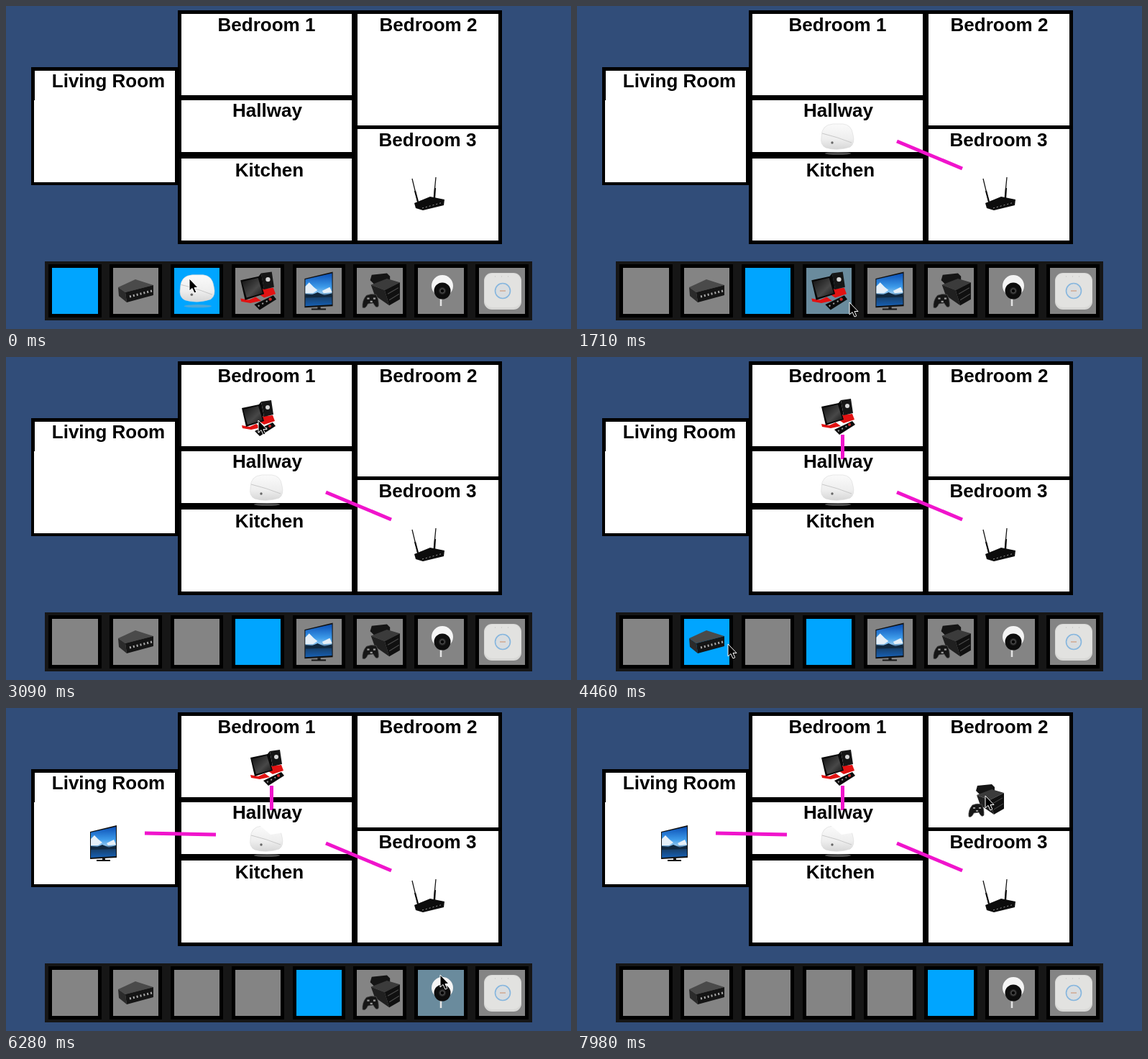
Animation, 786 px wide and 449 px high, one loop 8 s. Source, as an HTML page:

```html
<!DOCTYPE html>
<html lang="en">
<head>
<meta charset="utf-8">
<title>Room planner</title>
<style>
  html, body { margin: 0; width: 100%; height: 100%; overflow: hidden; background: #314d79; }
  svg { display: block; width: 100%; height: 100%; }
  text { font: bold 26px "Liberation Sans", Arial, sans-serif; text-anchor: middle; }
  .link { stroke: #f014cc; stroke-width: 5; }
</style>
</head>
<body>
<svg viewBox="0 0 786 449">
  <defs>
    <linearGradient id="sky" x2="0" y2="1">
      <stop stop-color="#0b4fb5"/><stop offset=".42" stop-color="#3d9bea"/>
      <stop offset=".6" stop-color="#8cc4ee"/><stop offset=".68" stop-color="#173a5e"/>
      <stop offset="1" stop-color="#1660b4"/>
    </linearGradient>
    <linearGradient id="shell" x2="0" y2="1">
      <stop stop-color="#fafafa"/><stop offset=".6" stop-color="#eee"/><stop offset="1" stop-color="#d6d6d6"/>
    </linearGradient>
    <linearGradient id="screen" x2="1" y2="1">
      <stop stop-color="#111"/><stop offset=".6" stop-color="#484848"/><stop offset="1" stop-color="#141414"/>
    </linearGradient>
  </defs>

  <path d="M35 85H240V249H35ZM239 6H690V331H239Z"/>
  <path fill="#fff" d="M40 90H235V245H39V131H40ZM244 11H481V124H244ZM244 131H481V203H244ZM244 212H481V326H244ZM489 11H685V166H489ZM489 171H685V326H489Z"/>
  <path class="link" data-from="1240" d="M445 188 536 226"/>
  <path class="link" data-from="3200" d="M369.5 108V142"/>
  <path class="link" data-from="6000" d="M193 174 292 176"/>
  <g transform="translate(.5 .4)">
    <text x="362" y="35">Bedroom 1</text>
    <text x="587" y="35">Bedroom 2</text>
    <text x="586" y="195">Bedroom 3</text>
    <text x="142" y="113">Living Room</text>
    <text x="363" y="154">Hallway</text>
    <text x="366" y="237">Kitchen</text>
  </g>

  <path fill="#161616" d="M54 355H732V437H54Z"/>
  <g id="slots" stroke="#000" stroke-width="5"></g>

  <!-- router -->
  <g transform="translate(587 261)">
    <path d="M-14 12-22-21M8 8 11-23" stroke="#161616" stroke-width="1.3"/>
    <path d="M-14 11-18-4M9 7 10-8" stroke="#111" stroke-width="2.2"/>
    <path fill="#0c0c0c" d="M-19 13 3 4 23 8 22 16-7 23-17 20Z"/>
    <path d="M-8 20 21 12" stroke="#999" stroke-dasharray="2 3"/>
  </g>
  <!-- network switch -->
  <g transform="translate(181 396)">
    <path fill="#4a4a4a" d="M-25-5-1-16 24-8-15 2Z"/>
    <path fill="#2b2b2b" d="M-25-5-15 2-13 16-24 7Z"/>
    <path fill="#151515" d="M-15 2 24-8V6L-13 16Z"/>
    <path d="M-9 8 22 0" stroke="#aaa" stroke-width="3" stroke-dasharray="2 3"/>
  </g>
  <!-- camera -->
  <g transform="translate(605 395)">
    <path d="M0 10V22" stroke="#e4e4e4" stroke-width="2.5"/>
    <circle cx="2" cy="-6" r="15" fill="#f4f4f4"/>
    <circle cx="2" cy="1" r="11.5" fill="#0d0d0d"/>
    <circle cx="2" cy="1" r="5" fill="#292929"/>
    <circle cx="2" cy="1" r="3" fill="#080808" stroke="#555"/>
  </g>
  <!-- wall sensor -->
  <g transform="translate(691 396)">
    <rect x="-26" y="-25" width="52" height="51" rx="11" fill="#d8d8d6"/>
    <rect x="-25" y="-24" width="50" height="47" rx="10" fill="#e2e2e0"/>
    <circle r="10.5" fill="#d9dde0" stroke="#86b6de" stroke-width="1.6"/>
    <path d="M-4 0H4" stroke="#d2a890" stroke-width="1.5"/>
    <path d="M-11-20H15" stroke="#bbb" stroke-dasharray="1 8"/>
  </g>

  <g id="tv">
    <path fill="#111" d="M-19-16 18-25V20L-19 22Z"/>
    <path fill="url(#sky)" d="M-18-15 17-23V18L-18 20Z"/>
    <path fill="#e6f0f8" d="M-18-6-13-11-7-5-2-1-8 3-18 3ZM4 0 14-5 17 2 6 3Z"/>
    <path fill="#10283f" d="M-18 4-9 5-2 2 7 6 17 3V8L-18 9Z"/>
    <path fill="#171717" d="M-2 21H2V23H9V25H-10V23H-2Z"/>
  </g>
  <g id="ap">
    <ellipse cx="1" cy="20" rx="18" ry="2" fill="#aaa" opacity=".45"/>
    <path fill="url(#shell)" stroke="#d8d8d8" stroke-width=".6" d="M-22-3Q-22-20-6-21H8Q20-20 22-6 25 6 18 11 0 17-16 12-24 8-22-3Z"/>
    <path d="M-21-8Q0-3 20 5" fill="none" stroke="#c8c8c8"/>
    <circle cx="-7" cy="5" r="1.7" fill="#666"/>
  </g>
  <path data-from="5560" fill="#fff" d="M350 161H391L387 173 368 176Z"/>
  <g id="pc">
    <path fill="#e21212" d="M-23 10-12 12-3 8 4 13-10 16-22 14ZM2-2 20-4 23 4 8 9 2 5Z"/>
    <path fill="#161616" d="M4-23 18-25 21-5 8-2Z"/>
    <path fill="#090909" d="M4-23 8-2 3-4 0-18Z"/>
    <circle cx="13" cy="-15" r="3" fill="#d8d8d8"/>
    <path fill="#080808" d="M-23-14 1-19 8 4-17 12Z"/>
    <path fill="url(#screen)" d="M-21-12 0-17 6 3-15 9Z"/>
    <path fill="#0b0b0b" d="M-5 18 20 6 24 11 2 25Z"/>
    <path d="M0 20 20 9" stroke="#999" stroke-width="2" stroke-dasharray="2 4"/>
    <circle cx="16" cy="11" r="2" fill="#c22"/>
  </g>
  <g id="console">
    <path fill="#151515" d="M-11-21 9-23 13-19V-11L-8-9-13-14Z"/>
    <path fill="#3b3b3b" d="M-12-8 9-16 26-11 6-1Z"/>
    <path fill="#202020" d="M-12-8 6-1 12 19-7 6Z"/>
    <path fill="#101010" d="M6-1 26-11V11L12 19Z"/>
    <path d="M10 4 24-4M12 12 25 4" stroke="#4c4c4c"/>
    <path fill="#161616" stroke="#555" stroke-width=".7" d="M-18 6Q-12 3-5 5-1 12-2 20-5 24-9 16L-16 17Q-19 24-23 22-24 13-18 6Z"/>
    <path d="M-17 10H-14M-9 10H-6M-13 14H-10" stroke="#999" stroke-width="2"/>
  </g>

  <path id="cursor" stroke="#fff" stroke-width="1" d="M0 0V17L4 13.5 7 20 9.8 18.8 7 12.5H12Z"/>
</svg>
<script>
const LOOP = 8000, TICK = 140, FIRST = 120;
const FADE = 100;   // highlight fade of a slot
const GRAB = 170;   // from the click on a slot to lifting its item
const $ = id => document.getElementById(id);

// Pointer stops: time, x, y
const stops = [
  [-175, 215, 395], [0, 255, 379], [260, 255, 379], [1100, 423, 176], [1450, 423, 176],
  [1660, 379, 412], [2700, 352, 395], [3060, 351, 88], [3340, 362, 100], [3620, 368, 390],
  [3900, 365, 405], [4320, 200, 425], [4460, 210, 399], [4850, 465, 410], [5160, 445, 396],
  [5560, 290, 185], [5860, 100, 172], [6000, 111, 183], [6280, 604, 371], [6840, 520, 395],
  [7140, 520, 395], [7960, 568, 122]];

// Slot, click time, offset below the pointer, drop time and place
const items = [
  { id: "ap", slot: 2, click: 60, dy: -3, drop: 1240, end: [362, 185] },
  { id: "pc", slot: 3, click: 2560, dy: -3, drop: 3200, end: [363, 83] },
  { id: "tv", slot: 4, click: 5090, dy: 0, drop: 6000, end: [136, 188] },
  { id: "console", slot: 5, click: 7100, dy: 7, drop: LOOP }];

const slotX = i => 64 + 84.88 * i;
const slots = Array.from({ length: 8 }, (_, i) => {
  const rect = document.createElementNS("http://www.w3.org/2000/svg", "rect");
  const left = Math.round(slotX(i)), right = Math.round(slotX(i) + 63.6);
  const attrs = { x: left - 2.5, y: 361.5, width: right - left + 5, height: 69 };
  for (const key in attrs) rect.setAttribute(key, attrs[key]);
  return $("slots").appendChild(rect);
});

// The picture refreshes in even ticks
const snap = t => Math.max(0, FIRST + TICK * Math.floor((t + 10 - FIRST) / TICK));

function pointer(t) {
  const i = stops.findIndex(s => s[0] > t);
  if (i < 0) return stops.at(-1).slice(1);
  if (i === 0) return stops[0].slice(1);
  const [t0, x0, y0] = stops[i - 1], [t1, x1, y1] = stops[i];
  const k = (t - t0) / (t1 - t0);
  return [x0 + (x1 - x0) * k, y0 + (y1 - y0) * k];
}

function isLit(i, t) {
  const selected = items.findLast(item => item.click <= t)?.slot ?? 0;
  const [x, y] = pointer(t), dx = x - slotX(i);
  return i === selected || (dx >= 0 && dx < 64 && y >= 364 && y < 428);
}

// Share of the last FADE ms in which the slot was lit
function glow(i, t) {
  let lit = 0;
  for (let ago = 0; ago < FADE; ago += 10) lit += isLit(i, t - ago);
  return lit * 10 / FADE;
}

const place = (id, [x, y], scale = 1) =>
  $(id).setAttribute("transform", `translate(${x} ${y}) scale(${scale})`);

function draw(time) {
  const t = snap(time % LOOP), [x, y] = pointer(t);
  place("cursor", [x, y]);
  for (const { id, slot, click, dy, drop, end } of items) {
    if (t < click + GRAB) place(id, [slotX(slot) + 32, 396], 1.06);
    else place(id, t < drop ? [x, y + dy] : end);
  }
  slots.forEach((rect, i) => {
    const k = glow(i, t);
    rect.setAttribute("fill", `rgb(${132 - 132 * k},${132 + 33 * k},${132 + 123 * k})`);
  });
  for (const el of document.querySelectorAll("[data-from]"))
    el.style.display = t < el.dataset.from ? "none" : "";
}

const start = performance.now();
function frame() {
  draw(performance.now() - start);
  requestAnimationFrame(frame);
}
frame();
</script>
</body>
</html>
```
